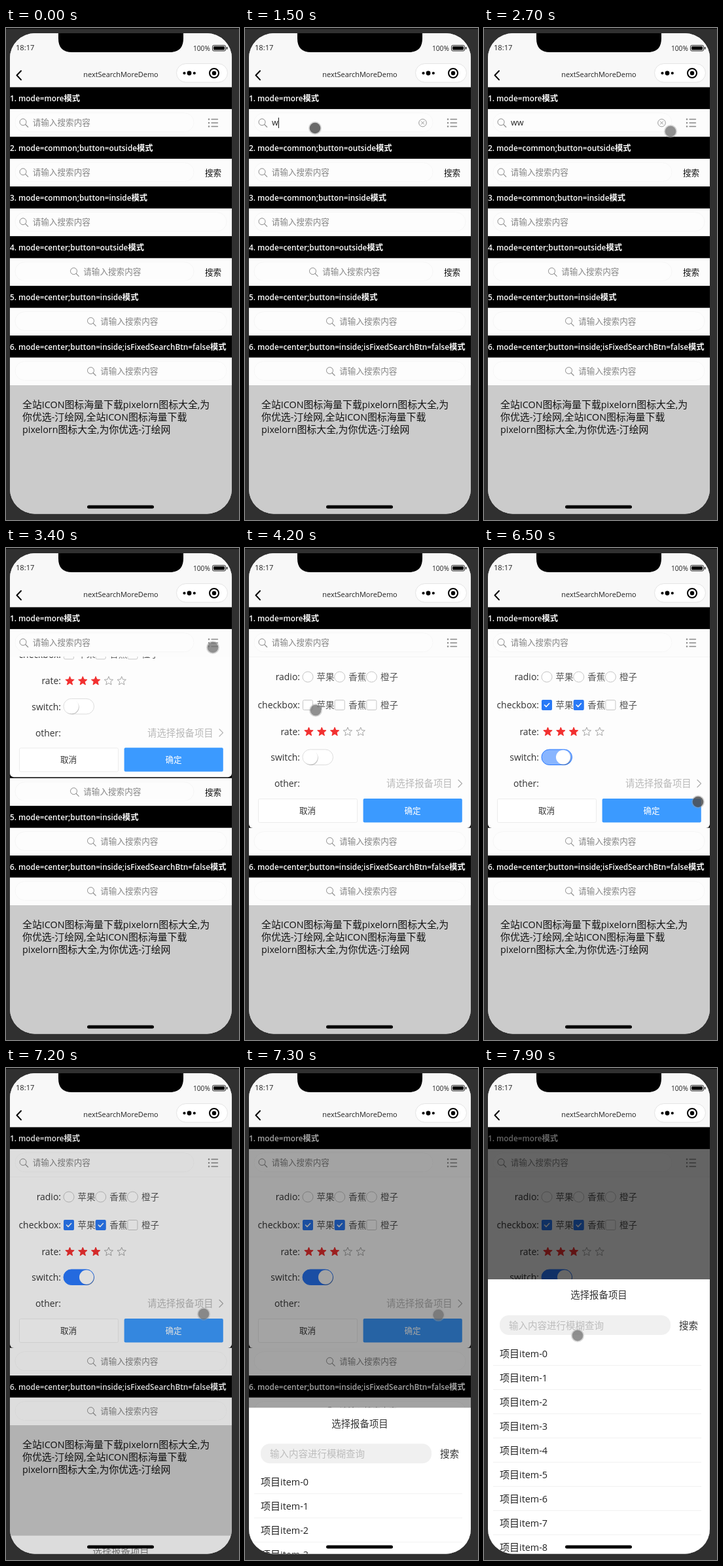
Animation, 356 px wide and 752 px high, one loop 8000 ms. Source, as an HTML page:

```html
<!DOCTYPE html>
<html lang="zh-CN">
<head>
<meta charset="utf-8">
<title>Search modes demo</title>
<style>
html, body { margin: 0; width: 100%; height: 100%; overflow: hidden; background: #303030; }
svg { display: block; width: 356px; height: 752px; }
text { font-family: "Open Sans", "Noto Sans CJK SC", "Noto Sans CJK", sans-serif; }
</style>
</head>
<body>
<svg id="stage" viewBox="0 0 356 752" xmlns="http://www.w3.org/2000/svg"></svg>
<script>
const LOOP = 8000, STEP = 100;
const BLUE = [41, 121, 255];

// ---- drawing helpers ----
const text = (x, y, str, size, fill, anchor = 'start', weight = 400) => {
  const body = str.replace(/[\x20-\x7e]+/g, m => `<tspan font-size="${size * 0.96}">${m}</tspan>`);
  return `<text x="${x}" y="${y + size * 0.37}" font-size="${size}" fill="${fill}" text-anchor="${anchor}" font-weight="${weight}">${body}</text>`;
};
const rect = (x, y, w, h, fill, r = 0, extra = '') =>
  `<rect x="${x}" y="${y}" width="${w}" height="${h}" rx="${r}" fill="${fill}" ${extra}/>`;
const circle = (x, y, r, fill, extra = '') => `<circle cx="${x}" cy="${y}" r="${r}" fill="${fill}" ${extra}/>`;
const line = (d, color, width) =>
  `<path d="${d}" fill="none" stroke="${color}" stroke-width="${width}" stroke-linecap="round" stroke-linejoin="round"/>`;
const group = (id, body, extra = '') => `<g id="${id}" ${extra}>${body}</g>`;
const times = (n, fn) => Array.from({ length: n }, (_, i) => fn(i)).join('');

const lens = (x, y) => circle(x - 1, y - 1, 5, 'none', 'stroke="#8c8c8c"') + line(`M${x + 2.7} ${y + 2.7}l4 4`, '#8c8c8c', 1.1);

const star = (x, y, full) => {
  const pts = Array.from({ length: 10 }, (_, i) => {
    const a = Math.PI * (i / 5 - 0.5), r = i % 2 ? 3.1 : 7;
    return `${(x + r * Math.cos(a)).toFixed(2)},${(y + r * Math.sin(a)).toFixed(2)}`;
  }).join(' ');
  return `<polygon points="${pts}" fill="${full ? '#f23030' : 'none'}" stroke="${full ? '#f23030' : '#a5a5a5'}" stroke-linejoin="round"/>`;
};

// ---- page parts ----
const HINT = '请输入搜索内容';
const rows = [
  { title: '1. mode=more模式', icon: 27, wide: 273 },
  { title: '2. mode=common;button=outside模式', icon: 27, wide: 273, button: true },
  { title: '3. mode=common;button=inside模式', icon: 27, wide: 323 },
  { title: '4. mode=center;button=outside模式', icon: 104.5, wide: 273, button: true },
  { title: '5. mode=center;button=inside模式', icon: 130.5, wide: 323 },
  { title: '6. mode=center;button=inside;isFixedSearchBtn=false模式', icon: 130.5, wide: 323 }
];

function row(r, i) {
  const y = 90.3 + 75.95 * i, c = y + 54.5;
  return rect(6, y, 339, 33.6, '#000') + text(6, y + 17, r.title, 12.3, '#fff', 'start', 600) +
    rect(14, c - 15, r.wide, 29, '#fdfdfd', 14.5, 'stroke="#f6f6f6"') + lens(r.icon, c) +
    group('hint' + i, text(r.icon + 13.7, c, HINT, 12.6, '#858585')) +
    (r.button ? text(304, c + 0.5, '搜索', 12.6, '#111', 'start', 500) : '');
}

const listIcon = times(3, i => {
  const y = 139.5 + 5.5 * i;
  return circle(310, y, 1.2, '#888') + line(`M314 ${y}H323.5`, '#888', 1.3);
});

const inputParts =
  group('typed', text(41, 144.5, '', 12.6, '#222')) +
  group('clear', circle(271.5, 145, 5.8, 'none', 'stroke="#999"') + line('M269.3 142.8l4.4 4.4M273.7 142.8l-4.4 4.4', '#999', 1)) +
  rect(41, 137, 1.2, 16, '#333', 0, 'id="caret"');

const essay = ['全站ICON图标海量下载pixelorn图标大全,为', '你优选-汀绘网,全站ICON图标海量下载', 'pixelorn图标大全,为你优选-汀绘网'];

const fruits = ['苹果', '香蕉', '橙子'];
const tick = x => group('tick' + x, rect(x - 8, 232, 16, 16, '#2979f6', 2) + line(`M${x - 3.5} 240l2.6 2.6 4.6-5`, '#fff', 1.5));
const fruitX = i => 96 + 48.7 * i;

const panel =
  rect(6, 160, 339, 268, '#fdfdfd', 6) + rect(6, 166, 339, 1, '#f4f4f4') +
  ['radio:', 'checkbox:', 'rate:', 'switch:', 'other:'].map((s, i) =>
    text(84, [197, 240, 280.5, 320, 360][i], s, 14.5, '#333', 'end')).join('') +
  times(3, i => circle(fruitX(i), 197, 8, '#fff', 'stroke="#c6c6c6"') +
    rect(fruitX(i) - 7.5, 232.5, 15, 15, '#fff', 2, 'stroke="#c6c6c6"') +
    text(fruitX(i) + 13.5, 197, fruits[i], 13.5, '#555') + text(fruitX(i) + 13.5, 240, fruits[i], 13.5, '#555')) +
  tick(96) + tick(144.7) +
  times(5, i => star(97.5 + 19.8 * i, 281, i < 3)) +
  rect(88, 308, 46.5, 23.5, '#fff', 11.7, 'id="track" stroke="#ddd"') +
  group('knob', circle(1, 1.2, 10.8, '#000', 'opacity=".22"') + circle(0, 0, 11, '#fff')) +
  text(216, 360, '请选择报备项目', 14.4, '#b9b9b9') + line('M326 354.5l5.5 5.5-5.5 5.5', '#b0b0b0', 1.3) +
  rect(20.5, 383.5, 151, 36, '#fff', 2, 'stroke="#ececec"') + text(95.5, 401, '取消', 12.6, '#333', 'middle') +
  rect(180.6, 383, 151.2, 36.5, '#3b9aff', 2) + text(256, 401, '确定', 12.6, '#fff', 'middle', 500);

const popup =
  rect(6, 323, 339, 422, '#fff') + text(175.5, 347, '选择报备项目', 14.4, '#333', 'middle') +
  rect(24, 378, 261, 30, '#f0f0f0', 14) + text(38, 393.5, '输入内容进行模糊查询', 14.5, '#bdbdbd') +
  text(298, 393.5, '搜索', 14.5, '#333') +
  times(9, i => text(24, 436 + 37 * i, '项目item-' + i, 15, '#222') + rect(14, 454 + 37 * i, 318, 1, '#f1f1f1'));

const nav =
  rect(6, 8, 339, 82.3, '#f8f8f8') +
  `<path d="M80 8H271V16Q271 37 250 37H101Q80 37 80 16Z"/>` +
  text(15, 30, '18:17', 11.6, '#222') + text(286, 31, '100%', 10.6, '#222') +
  rect(315.5, 26.5, 20, 8.5, 'none', 2, 'stroke="#222"') + rect(317, 28, 17, 5.5, '#000', 1) + rect(336.8, 29, 1.6, 3.5, '#222') +
  line('M23 65.5l-6.5 6.8 6.5 6.8', '#000', 2) + text(175.5, 71, 'nextSearchMoreDemo', 11.4, '#222', 'middle') +
  rect(260.5, 54.5, 78, 28.5, '#fff', 14.2, 'stroke="#e4e4e4"') +
  circle(272.5, 69, 2.1, '#000') + circle(280, 69, 3.4, '#000') + circle(287.8, 69, 2.1, '#000') +
  circle(318, 69, 7, 'none', 'stroke="#000" stroke-width="2"') + circle(318, 69, 3.2, '#000');

document.getElementById('stage').innerHTML =
  `<defs><clipPath id="screen">${rect(6, 8, 339, 734.5, '#000', 38)}</clipPath>
   <clipPath id="below">${rect(6, 166, 339, 270, '#000')}</clipPath></defs>` +
  rect(0, 0, 356, 752, '#303030') + rect(0, 0, 356, 1.5, '#0c0c0c') +
  `<g clip-path="url(#screen)">` +
  rect(6, 8, 339, 735, '#fcfcfc') + rows.map(row).join('') + listIcon + inputParts +
  rect(6, 546, 339, 200, '#cbcbcb') + essay.map((s, i) => text(25, 575 + 19 * i, s, 14.9, '#111')).join('') +
  `<g clip-path="url(#below)">${group('panel', panel)}</g>` +
  rect(6, 90, 339, 655, '#000', 0, 'id="shade"') + group('popup', popup) + nav +
  rect(124, 729.5, 102, 5, '#000', 2.5) + '</g>' +
  group('cursor', circle(0, 0, 10, '#999', 'opacity=".4"') + circle(0, 0, 8.3, '#666', 'id="dot"'));

// ---- motion ----
const el = id => document.getElementById(id);
const show = (id, on) => el(id).setAttribute('visibility', on ? 'visible' : 'hidden');
const set = (id, name, value) => el(id).setAttribute(name, value);
const span = (t, start, length) => Math.min(1, Math.max(0, (t - start) / length));
const easeOut = u => 1 - (1 - u) ** 3;
const easeInOut = u => u < 0.5 ? 2 * u * u : 1 - 2 * (1 - u) ** 2;

// time, x, y
const path = [
  [100, 336, 603], [600, 107, 153], [1700, 107, 153], [2500, 203, 168], [2700, 285, 158],
  [2900, 272, 147], [3100, 316, 152], [3400, 316, 152], [4200, 108, 248], [4400, 97, 242],
  [4800, 147, 242], [5000, 150, 243], [5200, 112, 418], [5400, 109, 408], [6000, 112, 322],
  [6300, 112, 322], [6500, 327, 388], [6900, 332, 362], [7100, 332, 362], [7200, 302, 376], [7900, 143, 409]
];

function cursorAt(t) {
  const i = Math.max(1, path.findIndex(p => p[0] >= t));
  const [t0, x0, y0] = path[i - 1], [t1, x1, y1] = path[i];
  const u = easeInOut(span(t, t0, t1 - t0));
  return [x0 + (x1 - x0) * u, y0 + (y1 - y0) * u];
}

function draw(t) {
  const word = t < 1500 || t >= 3000 ? '' : t < 1700 ? 'w' : 'ww';
  el('typed').firstChild.textContent = word;
  show('hint0', !word);
  show('clear', word);
  show('caret', t >= 1200 && t < 2500 && (t - 1200) % 1000 < 600);
  set('caret', 'x', 41 + word.length * 9.8);

  show('panel', t >= 3400);
  set('panel', 'transform', `translate(0 ${-262 * (1 - easeOut(span(t, 3300, 300)))})`);
  show('tick96', t >= 4400);
  show('tick144.7', t >= 4900);

  const on = span(t, 6300, 360);
  const tint = BLUE.map(c => Math.round(255 + (c - 255) * on));
  set('track', 'fill', `rgb(${tint})`);
  set('track', 'stroke', on > 0 ? `rgb(${BLUE})` : '#ddd');
  set('knob', 'transform', `translate(${100 + 23 * easeOut(on)} 319.8)`);

  const rise = span(t, 7145, 300);
  set('shade', 'opacity', 0.6 * Math.min(1, rise * 1.15));
  set('popup', 'opacity', Math.min(1, rise * 3));
  set('popup', 'transform', `translate(0 ${420 * (1 - easeInOut(rise))})`);

  show('cursor', t >= 100);
  set('cursor', 'transform', `translate(${cursorAt(t)})`);
  const pressed = t >= 900 && t < 1700 || t >= 6100 && t < 7100;
  set('dot', 'fill', pressed ? '#444' : '#666');
  set('dot', 'opacity', pressed ? 0.75 : 0.62);
}

let begin;
function tickFrame(now) {
  begin ??= now;
  draw(Math.floor((now - begin) % LOOP / STEP) * STEP);
  requestAnimationFrame(tickFrame);
}
draw(0);
requestAnimationFrame(tickFrame);
</script>
</body>
</html>
```
